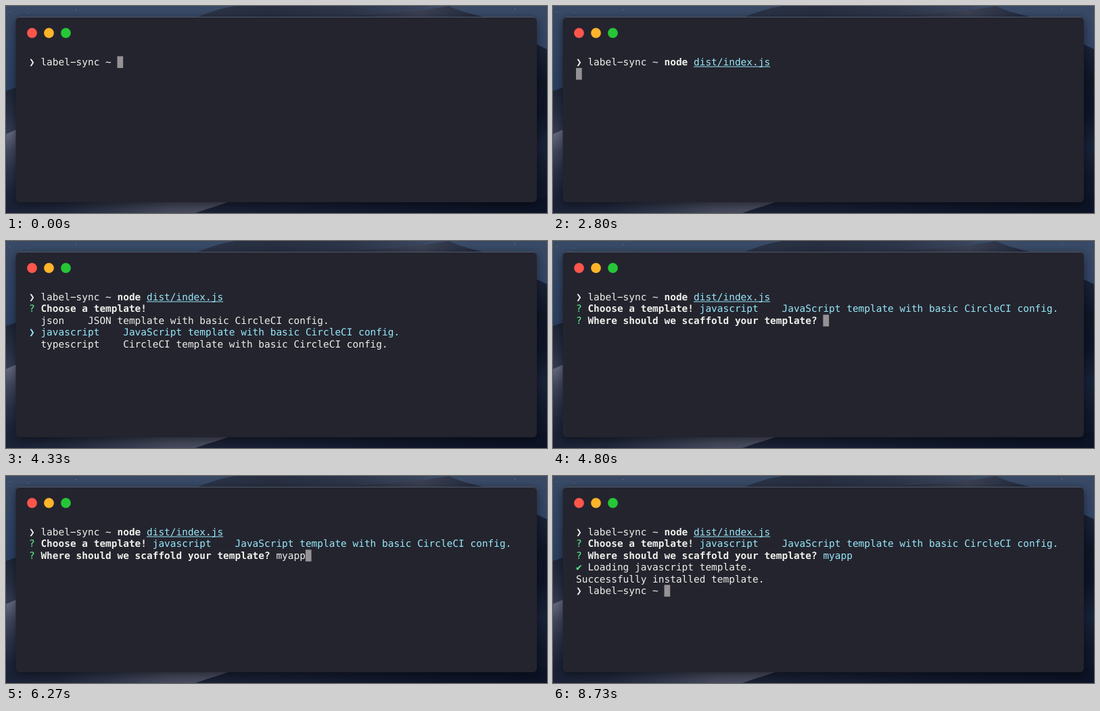
Recreate the animation shown at these times as an HTML page with a canvas. Size 800 by 307 pixels, loop 8790 ms.

```html
<!DOCTYPE html>
<html lang="en">
<head>
<meta charset="utf-8">
<title>Terminal demo</title>
<style>
  html, body { margin: 0; width: 100%; height: 100%; overflow: hidden; background: #141a2c; }
  canvas { display: block; width: 800px; height: 307px; }
</style>
</head>
<body>
<canvas id="stage"></canvas>
<script>
const W = 800, H = 307, LOOP = 8790;
const LEFT = 34, COL = 8.7, ROW = 17.4, BASE = 88, TOP = 74.5;
const FONT = '14.45px "DejaVu Sans Mono", monospace';
const C = {
  text: '#eff0eb', cyan: '#97e9fa', green: '#5af78e', red: '#ed5147',
  ghost: '#5c5c61', cursor: '#949295', panel: '#24242e'
};

// Moments at which the session changes, in ms.
const T = {
  keyN: 1330, keyO: 1530, accept: 2070, run: 2530, list: 2870,
  down: 3530, pick: 4730, name: [5270, 5400, 5600, 5800, 5930],
  submit: 6730, load: 6800, done: 8130, prompt: 8270
};

const canvas = document.getElementById('stage');
const scale = window.devicePixelRatio || 1;
canvas.width = W * scale;
canvas.height = H * scale;
const ctx = canvas.getContext('2d');

function fade(x0, y0, x1, y1, ...colors) {
  const g = ctx.createLinearGradient(x0, y0, x1, y1);
  colors.forEach((c, i) => g.addColorStop(i / (colors.length - 1), c));
  return g;
}

function shape(path, fill) {
  ctx.fillStyle = fill;
  ctx.fill(new Path2D(path));
}

function drawDesert() {
  ctx.fillStyle = fade(0, 0, 0, 130, '#394a66', '#2a3f62');
  ctx.fillRect(0, 0, W, H);

  ctx.fillStyle = 'rgba(210,220,235,.45)';
  for (const [x, y] of [[31, 10], [5, 8], [103, 5], [752, 4]]) ctx.fillRect(x, y, 1, 1);

  // far dune, then the ridge with its peak
  shape('M278 18 C295 12 315 3 340 0 L625 0 L600 18 Z',
    fade(280, 0, 620, 0, '#2a3347', '#272e40', '#2d3549', '#3a465e'));
  shape('M430 18 C530 14 600 10 655 0 C670 8 690 12 712 18 Z',
    fade(440, 0, 700, 0, '#262d3f', '#2b3244', '#3b4153', '#222a3d'));

  // slopes at both sides
  shape('M770 50 L800 64 L800 307 L770 307 Z',
    fade(0, 60, 0, H, '#1a2238', '#0f1626', '#0e1527', '#182339', '#10182b', '#0d1426'));
  shape('M0 126 L18 120 L18 307 L0 307 Z',
    fade(0, 122, 0, 190, '#1d2537', '#272e42', '#353c52'));
  shape('M0 190 L18 182 L18 307 L0 307 Z',
    fade(0, 184, 0, H, '#686d82', '#40465c', '#2b3247', '#1d253b', '#182036'));

  // lit dune along the bottom with the shaded side to its right
  shape('M0 284 L800 284 L800 307 L0 307 Z',
    fade(283, 0, W, 0, '#1b2137', '#161d32', '#10172b', '#0c1326'));
  shape('M0 284 L350 284 C320 294 300 300 280 307 L0 307 Z',
    fade(0, 0, 320, 0, '#1a2237', '#20273b', '#31374b', '#454a5d', '#4a4e60'));
}

function drawWindow() {
  ctx.save();
  ctx.shadowColor = 'rgba(0,0,0,.5)';
  ctx.shadowBlur = 14 * scale;
  ctx.shadowOffsetY = 4 * scale;
  ctx.fillStyle = C.panel;
  ctx.beginPath();
  ctx.roundRect(14.5, 16, 770.5, 275, 6);
  ctx.fill();
  ctx.restore();

  // only the top edge catches light
  ctx.lineWidth = 1;
  ctx.strokeStyle = fade(0, 16, 0, 22, '#596170', 'rgba(36,36,46,0)');
  ctx.beginPath();
  ctx.roundRect(15, 16.5, 769.5, 274, 5.5);
  ctx.stroke();

  ['#ff564c', '#ffb429', '#26c637'].forEach((c, i) => {
    ctx.fillStyle = c;
    ctx.beginPath();
    ctx.arc(38.5 + 25 * i, 40, 7.4, 0, Math.PI * 2);
    ctx.fill();
  });
}

// Writes on the character grid and returns the next free column.
function write(row, col, str, color = C.text, bold = false) {
  ctx.font = (bold ? 'bold ' : '') + FONT;
  ctx.fillStyle = color;
  for (const ch of str) {
    // the terminal face has a wide hyphen
    const glyph = ch === '-' ? '\u2212' : ch;
    if (ch !== ' ') ctx.fillText(glyph, LEFT + col * COL, BASE + row * ROW);
    col++;
  }
  return col;
}

function cursor(row, col, under = '') {
  ctx.fillStyle = C.cursor;
  ctx.fillRect(LEFT + col * COL, TOP + row * ROW, COL, ROW);
  write(row, col, under, C.panel);
}

function prompt(row) {
  return write(row, 0, '❯ label-sync ~ ');
}

function question(row, str) {
  write(row, 0, '?', C.green);
  return write(row, 2, str, C.text, true) + 1;
}

function drawCommand(t) {
  const col = prompt(0);
  const cmd = 'node', file = 'dist/index.js';
  if (t < T.accept) {
    const n = (t >= T.keyN) + (t >= T.keyO);
    const line = cmd + ' ' + file;
    write(0, col, line.slice(0, n), C.red);
    if (n) write(0, col + n + 1, line.slice(n + 1), C.ghost);
    cursor(0, col + n, n ? line[n] : '');
    return;
  }
  const start = write(0, col, cmd, C.text, true) + 1;
  const end = write(0, start, file, C.cyan);
  ctx.fillRect(LEFT + start * COL, 89.5, (end - start) * COL, 1);
  if (t < T.run) cursor(0, end);
  else if (t < T.list) cursor(1, 0);
}

const choices = [['json', 'JSON'], ['javascript', 'JavaScript'], ['typescript', 'CircleCI']]
  .map(([key, kind]) => `${key}    ${kind} template with basic CircleCI config.`);

function drawChoice(t) {
  const col = question(1, 'Choose a template!');
  if (t >= T.pick) {
    write(1, col, choices[1], C.cyan);
    return;
  }
  const active = t < T.down ? 0 : 1;
  choices.forEach((str, i) => {
    const on = i === active;
    write(2 + i, 0, (on ? '❯ ' : '  ') + str, on ? C.cyan : C.text);
  });
}

function drawName(t) {
  const col = question(2, 'Where should we scaffold your template?');
  const n = T.name.filter(at => t >= at).length;
  const sent = t >= T.submit;
  const end = write(2, col, 'myapp'.slice(0, n), sent ? C.cyan : C.text);
  if (!sent) cursor(2, end);
}

// Braille spinner: bits 0-2 are the left dots, bits 3-5 the right ones.
const spin = [...'⠋⠙⠹⠸⠼⠴⠦⠧⠇⠏'].map(ch => ch.codePointAt(0) & 63);

function drawSpinner(t) {
  const bits = spin[Math.floor((t - 6320) / 80) % spin.length];
  ctx.fillStyle = C.cyan;
  for (let i = 0; i < 6; i++) {
    if (!(bits >> i & 1)) continue;
    ctx.beginPath();
    ctx.arc(i < 3 ? 37.2 : 40.6, 131.4 + (i % 3) * 3.9, 0.95, 0, Math.PI * 2);
    ctx.fill();
  }
}

function drawInstall(t) {
  write(3, 2, 'Loading javascript template.');
  if (t < T.done) {
    drawSpinner(t);
    return;
  }
  write(3, 0, '✔', C.green);
  write(4, 0, 'Successfully installed template.');
  if (t >= T.prompt) cursor(5, prompt(5));
}

function draw(t) {
  ctx.setTransform(scale, 0, 0, scale, 0, 0);
  ctx.textBaseline = 'alphabetic';
  ctx.textRendering = 'geometricPrecision';
  drawDesert();
  drawWindow();
  drawCommand(t);
  if (t >= T.list) drawChoice(t);
  if (t >= T.pick) drawName(t);
  if (t >= T.load) drawInstall(t);
}

const began = performance.now();
function tick() {
  draw((performance.now() - began) % LOOP);
  requestAnimationFrame(tick);
}
tick();
</script>
</body>
</html>
```
